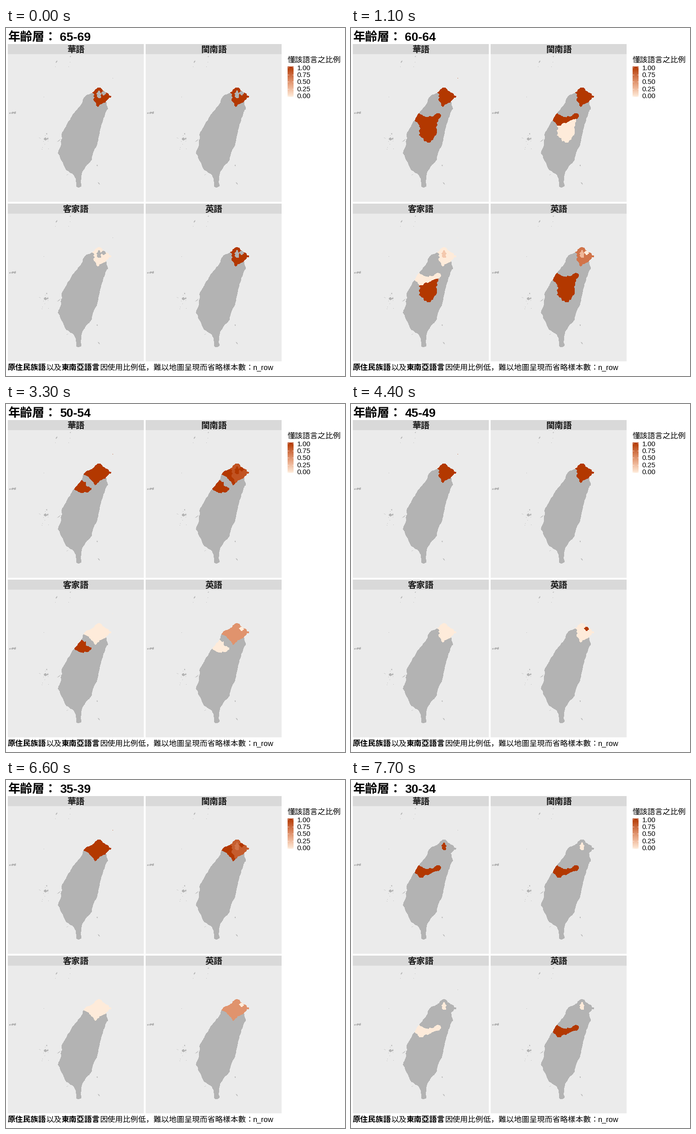
A matplotlib script that plays this animation: 738x759 px, repeating every 8 s.

```python
import math
import matplotlib.pyplot as plt
from matplotlib.animation import FuncAnimation
from matplotlib.colors import LinearSegmentedColormap
from matplotlib.patches import Polygon, Rectangle

W, H = 738, 759
STEP = 100           # ms per frame
HOLD = 11            # frames per age group
GREY = "#b3b3b3"
CJK, LATIN = "Noto Sans CJK JP", "Liberation Sans"

ramp = LinearSegmentedColormap.from_list(
    "ratio", ["#feebda", "#f2bfa2", "#e0936d", "#ca6639", "#b33800"])

fig = plt.figure(figsize=(W / 100, H / 100), dpi=100, facecolor="white")
ax = fig.add_axes([0, 0, 1, 1])
ax.set_xlim(0, W)
ax.set_ylim(H, 0)
ax.axis("off")

# Border arcs in pixels of the first panel; each ends where the next begins
north_coast = [(188, 142), (188, 140), (192, 138), (194, 134), (198, 131), (203, 130),
               (207, 132), (209, 136), (213, 138), (216, 141), (222, 143), (223, 147),
               (228, 148), (228, 150), (223, 151), (221, 155), (218, 157), (216, 160)]
newtp_south = [(216, 160), (213, 162), (207, 165), (203, 166), (202, 169), (198, 171)]
newtp_west = [(198, 171), (195, 168), (195, 164), (190, 159), (189, 155), (192, 151),
              (189, 148), (191, 145), (188, 142)]
taoyuan_south = [(198, 171), (196, 174), (193, 176), (191, 172), (189, 168), (184, 163),
                 (180, 158), (174, 155), (169, 153)]
taoyuan_coast = [(169, 153), (173, 148), (178, 145), (184, 143), (188, 142)]
hsinchu_coast = [(164, 166), (167, 159), (169, 153)]
miaoli_coast = [(148, 186), (152, 181), (157, 174), (164, 166)]
miaoli_north = [(164, 166), (168, 170), (173, 170), (173, 178), (179, 180), (185, 183),
                (184, 188)]
miaoli_south = [(184, 188), (181, 191), (176, 193), (171, 192), (168, 195), (162, 194),
                (157, 192), (152, 189), (148, 186)]
taichung_coast = [(139, 201), (143, 193), (148, 186)]
taichung_east = [(184, 188), (188, 186), (193, 187), (195, 190), (194, 193), (189, 198)]
taichung_south = [(189, 198), (184, 199), (179, 201), (174, 204), (169, 207), (163, 207),
                  (158, 210), (156, 213), (151, 213)]
taichung_west = [(151, 213), (147, 209), (145, 205), (139, 201)]
nantou_rim = [(151, 213), (148, 214), (151, 218), (148, 223), (150, 228), (148, 233),
              (153, 238), (158, 240), (159, 246), (164, 246), (166, 249), (173, 248),
              (174, 244), (178, 243), (180, 237), (184, 233), (186, 224), (184, 217),
              (187, 212), (186, 206), (189, 203), (189, 198)]
east_coast = [(216, 160), (218, 165), (219, 170), (221, 176), (217, 181), (215, 186),
              (211, 196), (209, 205), (206, 215), (203, 228), (200, 240), (198, 250),
              (195, 259), (190, 268), (187, 278), (186, 286), (180, 294), (172, 302),
              (167, 310), (164, 318), (163, 328), (162, 338), (163, 345)]
west_coast = [(163, 345), (158, 347), (153, 345), (153, 337), (152, 328), (148, 320),
              (140, 315), (131, 309), (126, 299), (120, 287), (117, 277), (113, 272),
              (114, 268), (118, 260), (120, 250), (120, 245), (122, 241), (121, 233),
              (122, 228), (127, 220), (134, 207), (139, 201)]


def rough(points):
    """Add a displaced midpoint to every edge, the same from either side."""
    out = []
    for (x0, y0), (x1, y1) in zip(points, points[1:] + points[:1]):
        out.append((x0, y0))
        size = math.hypot(x1 - x0, y1 - y0)
        if size > 2:
            turn = 12.9898 * (x0 + x1) + 78.233 * (y0 + y1)
            push = min(0.14 * size, 0.9)
            out.append(((x0 + x1) / 2 + push * math.cos(turn),
                        (y0 + y1) / 2 + push * math.sin(turn)))
    return out


def ring(*arcs):
    return rough([p for arc in arcs for p in arc[:-1]])


ISLAND = ring(north_coast, east_coast, west_coast, taichung_coast, miaoli_coast,
              hsinchu_coast, taoyuan_coast)
REGIONS = {
    "newtp": ring(north_coast, newtp_south, newtp_west),
    "taipei": rough([(202, 136), (204, 140), (207, 143), (205, 147), (206, 151),
                     (201, 152), (198, 149), (199, 145), (197, 143), (200, 140)]),
    "keelung": rough([(207, 141), (210, 138), (213, 138), (216, 141), (217, 143),
                      (214, 144), (213, 146), (210, 144)]),
    "taoyuan": ring(newtp_west[::-1], taoyuan_south, taoyuan_coast),
    "miaoli": ring(miaoli_coast, miaoli_north, miaoli_south),
    "taichung": ring(miaoli_south[::-1], taichung_east, taichung_south,
                     taichung_west, taichung_coast),
    "nantou": ring(taichung_south, nantou_rim),
}
ISLETS = [
    [(11, 184), (14, 182), (17, 183), (21, 181), (21, 186), (18, 187), (16, 185),
     (13, 187), (11, 186)],
    [(6, 185), (9, 183), (10, 186), (7, 187)],
    [(108, 73), (111, 70), (111, 73), (108, 76)],
    [(138, 62), (141, 60), (140, 63)],
    [(82, 240), (86, 238), (88, 241), (91, 238), (92, 242), (88, 243), (86, 245), (82, 243)],
    [(87, 229), (89, 229), (89, 232), (87, 231)],
    [(110, 248), (114, 245), (119, 241), (115, 246)],
    [(197, 298), (199, 298), (199, 301), (197, 300)],
    [(199, 336), (202, 337), (204, 341), (202, 340)],
]
SPECKS = [(107, 84), (136, 84), (139, 74), (82, 150), (85, 234), (74, 240), (72, 239),
          (91, 246), (84, 253), (92, 263), (78, 264), (79, 260), (81, 247), (132, 320),
          (134, 319)]

LANGUAGES = ["華語", "閩南語", "客家語", "英語"]
# Share of speakers by region, one value per language panel
GROUPS = [
    ("65-69", dict(newtp=(1, 1, 0, 1))),
    ("60-64", dict(newtp=(1, 1, 0, .67), taipei=(1, 1, .2, .3), keelung=(1, 1, 0, 0),
                   taichung=(1, 1, 0, 1), nantou=(1, 0, 1, 1))),
    ("55-59", dict(newtp=(1, 1, 0, .73), taipei=(1, .92, 0, .5), keelung=(1, 1, 0, 1),
                   taoyuan=(1, 1, 0, .5), miaoli=(1, 0, 0, 0), taichung=(1, .85, 0, .33))),
    ("50-54", dict(newtp=(1, .85, 0, .5), taipei=(1, 1, 0, .5), keelung=(1, 1, 0, 0),
                   taoyuan=(1, 1, 0, .5), miaoli=(1, 1, 1, 0))),
    ("45-49", dict(newtp=(1, 1, 0, 0), taipei=(1, 1, 0, 0), keelung=(1, 1, 0, 1))),
    ("40-44", dict(newtp=(1, .7, 0, .13), taipei=(1, .5, 0, .5), keelung=(1, 0, 0, .5),
                   taoyuan=(1, 1, 0, 0), nantou=(1, 1, 0, 1))),
    ("35-39", dict(newtp=(1, .8, 0, .5), taipei=(1, .67, 0, .5), keelung=(1, 1, 0, 0),
                   taoyuan=(1, 1, 0, .5))),
    ("30-34", dict(taipei=(1, 0, 0, 0), taichung=(1, 1, 0, 1))),
]


def box(x, y, w, h, color):
    ax.add_patch(Rectangle((x, y), w, h, fc=color, lw=0))


def shape(points, dx, dy, smooth=False):
    moved = [(x + dx + 0.5, y + dy + 0.5) for x, y in points]
    return ax.add_patch(Polygon(moved, fc=GREY, lw=0, antialiased=smooth))


def label(x, y, text, px, font=CJK, bold=False, color="black", ha="left"):
    return ax.text(x, y, text, size=px * 0.72, family=font, color=color, ha=ha,
                   va="baseline", weight="bold" if bold else "normal")


def square(x, y, r):
    return [(x - r, y - r), (x + r, y - r), (x + r, y + r), (x - r, y + r)]


panels = []
for k, name in enumerate(LANGUAGES):
    dx, dy = 300.4 * (k % 2), 348.3 * (k // 2)
    box(4 + dx, 34.5 + dy, 296, 22.5, "#d9d9d9")
    box(4 + dx, 57 + dy, 296, 321.5, "#ebebeb")
    label(152 + dx, 52.7 + dy, name, 18.9, bold=True, color="#1a1a1a", ha="center")
    shape(ISLAND, dx, dy)
    for islet in ISLETS:
        shape(islet, dx, dy, True)
    for x, y in SPECKS:
        shape(square(x, y, 0.55), dx, dy, True)
    parts = {key: [shape(pts, dx, dy)] for key, pts in REGIONS.items()}
    parts["keelung"].append(shape(square(232, 109, 0.4), dx, dy, True))
    panels.append(parts)

label(4, 28, "年齡層：", 26.5, bold=True)
age = label(117.3, 28, "", 26.4, LATIN, True)

label(613, 74.5, "懂該語言之比例", 16.67)
ax.imshow([[1 - i / 99] for i in range(100)], cmap=ramp, vmin=0, vmax=1,
          extent=(613, 626, 150, 84), aspect="auto", interpolation="bilinear")
for i in range(5):
    y = 86.2 + 15.45 * i
    label(633.5, y + 5.3, f"{1 - i / 4:.2f}", 15, LATIN)
    for x in (613, 623.4):
        ax.plot([x, x + 2.6], [y, y], color="white", lw=0.5, solid_capstyle="butt")
ax.set_xlim(0, W)
ax.set_ylim(H, 0)

EM = 16.7
x = 4
for text, bold in [("原住民族語", True), ("以及", False), ("東南亞語言", True),
                   ("因使用比例低，難以地圖呈現而省略樣本數：", False)]:
    label(x, 745.7, text, EM, bold=bold)
    x += EM * len(text)
label(x, 745.7, "n_row", 16.4, LATIN)


def update(i):
    name, shares = GROUPS[i // HOLD]
    age.set_text(name)
    for k, parts in enumerate(panels):
        for key, patches in parts.items():
            color = ramp(float(shares[key][k])) if key in shares else GREY
            for patch in patches:
                patch.set_facecolor(color)
    return []


anim = FuncAnimation(fig, update, frames=80, interval=STEP, repeat=True, repeat_delay=0)
plt.show()
```
